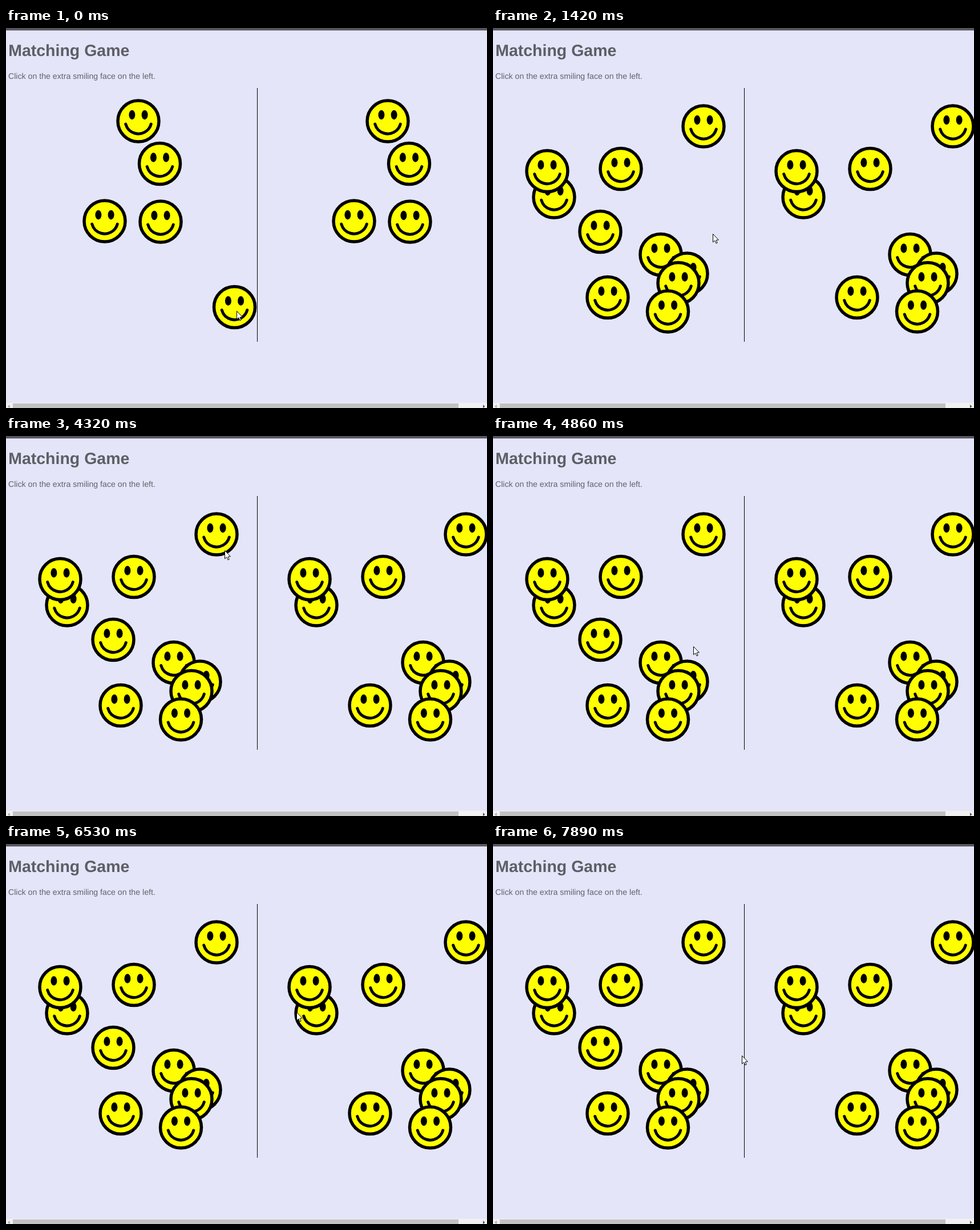
An HTML page with a canvas for the animation above (8000 ms loop, 843 px wide and 665 px high).

```html
<!DOCTYPE html>
<html lang="en">
<head>
<meta charset="utf-8">
<title>Matching Game</title>
<style>
  html, body { margin: 0; width: 100%; height: 100%; overflow: hidden; background: #e4e5f8; }
  canvas { position: absolute; left: 0; top: 0; display: block; }
  h1, p {
    position: absolute; margin: 0; line-height: 1; white-space: nowrap;
    font-family: "Liberation Sans", Arial, sans-serif; text-rendering: geometricPrecision;
  }
  h1 { left: 4.2px; top: 26px; font-size: 28.5px; color: #5e5e66; }
  p { left: 4px; top: 77px; font-size: 14.15px; color: #62626b; }
</style>
</head>
<body>
<canvas id="stage" width="843" height="665"></canvas>
<h1>Matching Game</h1>
<p>Click on the extra smiling face on the left.</p>
<script>
const ctx = document.getElementById('stage').getContext('2d');
const LOOP = 8000;
const SECOND_ROUND = 440;
const SIDE_SHIFT = 437;

// The pointer is sampled on a coarse clock.
const TICK = 132.7;
const TICK_START = 1085;

// Face centres in stacking order; the last one has no twin on the right.
const rounds = [
  [[232, 163], [269.5, 237.5], [173, 338], [271, 339], [400.5, 488.5]],
  [[369, 172], [107, 296], [95, 250.5], [224, 246.5], [294, 396.5],
   [340, 430], [325, 446.5], [306.5, 496], [201, 471.5], [188, 356.5]]
];

// Turning points of the pointer: tick, x, y
const turns = [
  [-1, 404, 495], [0, 413, 465], [2, 385, 360], [5, 376, 346], [8, 394, 193],
  [11, 387, 181], [23, 387, 181], [28, 351, 368], [30, 289, 318], [32, 352, 244],
  [35, 462, 277], [37, 434, 292], [41, 509, 294], [46, 273, 326], [49, 272, 327],
  [51, 436, 370]
];

const ease = u => u * u * (3 - 2 * u);

function pointerAt(t) {
  const tick = Math.max(-1, Math.floor((t - TICK_START) / TICK));
  const next = turns.findIndex(turn => turn[0] > tick);
  if (next < 0) return turns[turns.length - 1].slice(1);
  const [k0, x0, y0] = turns[next - 1];
  const [k1, x1, y1] = turns[next];
  const u = ease((tick - k0) / (k1 - k0));
  return [x0 + (x1 - x0) * u, y0 + (y1 - y0) * u].map(Math.round);
}

function rect(color, x, y, w, h) {
  ctx.fillStyle = color;
  ctx.fillRect(x, y, w, h);
}

function polygon(points, fill) {
  ctx.beginPath();
  for (const [x, y] of points) ctx.lineTo(x, y);
  ctx.closePath();
  ctx.fillStyle = fill;
  ctx.fill();
}

function drawFace(x, y) {
  ctx.save();
  ctx.translate(x, y);
  ctx.strokeStyle = '#000';
  ctx.lineCap = 'round';

  ctx.beginPath();
  ctx.arc(0, 0, 36, 0, Math.PI * 2);
  ctx.fillStyle = '#ff0';
  ctx.fill();
  ctx.lineWidth = 5.5;
  ctx.stroke();

  ctx.fillStyle = '#000';
  for (const side of [-1, 1]) {
    ctx.beginPath();
    ctx.ellipse(side * 11.1, -11, 5.5, 8.2, 0, 0, Math.PI * 2);
    ctx.fill();
  }

  ctx.beginPath();
  ctx.arc(0, -1, 23.1, 0.27, Math.PI - 0.27);
  ctx.lineWidth = 5;
  ctx.stroke();
  ctx.restore();
}

function drawPointer(x, y) {
  ctx.save();
  ctx.translate(x, y);
  polygon([[0.5, 0.5], [0.5, 14.8], [3.7, 11.9], [6.1, 16.9], [8.2, 16], [6, 11.2], [10.4, 10.9]], '#fff');
  ctx.strokeStyle = '#000';
  ctx.lineWidth = 1;
  ctx.stroke();
  ctx.restore();
}

function drawPage() {
  rect('#e4e5f8', 0, 0, 843, 665);
  rect('#55555d', 0, 0, 843, 4);
  rect('#b0b0bd', 0, 4, 843, 0.8);
  rect('#000', 440, 105, 1, 444);
  rect('#f1f1f1', 0, 656, 843, 9);
  rect('#c1c1c1', 12, 657, 781, 8);
  polygon([[3, 662.5], [6.5, 659], [6.5, 665]], '#a3a3a3');
  polygon([[839.5, 662.5], [836, 659], [836, 665]], '#505050');
}

function render(t) {
  drawPage();
  const faces = rounds[t < SECOND_ROUND ? 0 : 1];
  faces.forEach(([x, y], i) => {
    drawFace(x, y);
    if (i < faces.length - 1) drawFace(x + SIDE_SHIFT, y);
  });
  drawPointer(...pointerAt(t));
}

const start = performance.now();
function tick() {
  render((performance.now() - start) % LOOP);
  requestAnimationFrame(tick);
}
tick();
</script>
</body>
</html>
```
